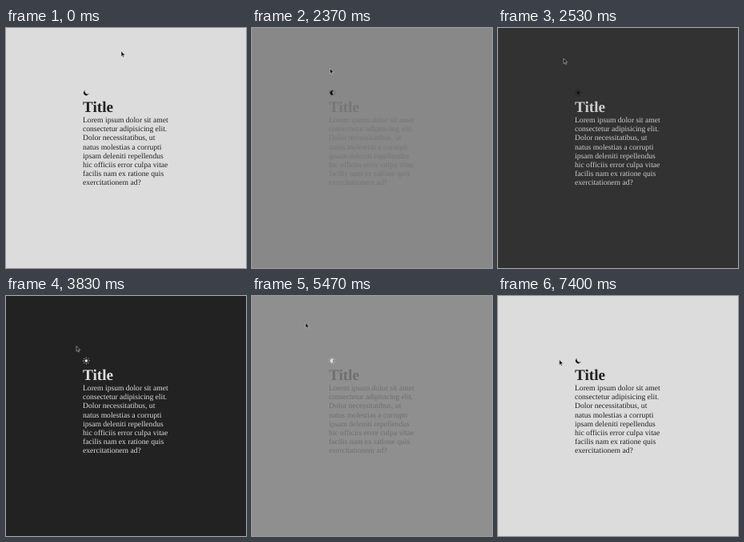
Recreate the animation shown at these times as an HTML page. Size 300x300 px, loop 7.43 s.

```html
<!DOCTYPE html>
<html lang="en">
<head>
<meta charset="utf-8">
<title>Theme toggle</title>
<style>
  html, body { margin: 0; width: 100%; height: 100%; overflow: hidden; }
  svg { display: block; width: 100%; height: 100%; }
  text { font-family: "Liberation Serif", "Times New Roman", serif; font-size: 9.6px; text-rendering: geometricPrecision; }
  .title { font-size: 19.2px; font-weight: bold; }
</style>
</head>
<body>
<svg viewBox="0 0 300 300">
  <rect id="page" width="300" height="300"/>
  <g id="copy"><text class="title" x="96" y="105">Title</text></g>
  <g transform="translate(95.9 76.6) scale(.364)">
    <g id="icon">
      <mask id="bite" maskUnits="userSpaceOnUse" x="-12" y="-12" width="48" height="48">
        <rect x="-12" y="-12" width="48" height="48" fill="#fff"/>
        <circle id="shadow" r="9"/>
      </mask>
      <circle id="core" cx="12" cy="12" mask="url(#bite)"/>
      <g id="rays" stroke-width="2" stroke-linecap="round"></g>
    </g>
  </g>
  <path id="cursor" d="M0 0V6.6L1.5 5.3 2.5 7.5 3.6 7 2.6 4.9H4.7Z" fill="#111" stroke="#d8d8d8" stroke-width=".55"/>
</svg>
<script>
const LOOP = 7430;
const FADE = 430;
const TO_DARK = 2255;
const TO_LIGHT = 5325;
const SPRING_LEAD = 20;

const lines = [
  'Lorem ipsum dolor sit amet',
  'consectetur adipisicing elit.',
  'Dolor necessitatibus, ut',
  'natus molestias a corrupti',
  'ipsam deleniti repellendus',
  'hic officiis error culpa vitae',
  'facilis nam ex ratione quis',
  'exercitationem ad?'
];

const linear = p => p;
const easeIn = p => p ** 1.7;
const easeOut = p => 1 - (1 - p) ** 1.7;
const easeInOut = p => p * p * (3 - 2 * p);

// time, x, y, easing towards the next stop
const path = [
  [0, 144, 29, easeInOut],
  [780, 112.5, 80, easeOut],
  [1230, 100.5, 80, linear],
  [2110, 100.5, 80, easeIn],
  [2370, 97.5, 50.5, linear],
  [2530, 82, 38, easeOut],
  [2880, 66.5, 36.5, easeInOut],
  [3100, 70.5, 38.5, linear],
  [3480, 70.5, 38.5, easeIn],
  [3830, 88, 62.5, easeOut],
  [4240, 94.8, 75, easeInOut],
  [4630, 101.8, 77.3, linear],
  [4980, 101.8, 77.3, easeInOut],
  [5470, 67, 33.5, linear],
  [5600, 62.3, 30.8, easeOut],
  [5770, 61.5, 31.3, easeInOut],
  [6170, 63.3, 35.3, linear],
  [6980, 63.3, 35.3, easeInOut],
  [7400, 76.7, 79.7, linear],
  [LOOP, 76.7, 79.7, linear]
];

const $ = id => document.getElementById(id);
const mix = (a, b, p) => a + (b - a) * p;
const gray = v => `rgb(${v},${v},${v})`;

function add(parent, tag, attrs) {
  const node = document.createElementNS('http://www.w3.org/2000/svg', tag);
  for (const key in attrs) node.setAttribute(key, attrs[key]);
  return parent.appendChild(node);
}

lines.forEach((line, i) => {
  add($('copy'), 'text', { x: 96, y: 118.2 + i * 11.14 }).textContent = line;
});
for (let angle = 0; angle < 360; angle += 45) {
  add($('rays'), 'path', { d: 'M12 1V3', transform: `rotate(${angle} 12 12)` });
}

// CSS "ease": cubic-bezier(.25, .1, .25, 1)
function ease(p) {
  if (p <= 0) return 0;
  if (p >= 1) return 1;
  const bezier = (a, b, u) => 3 * a * u * (1 - u) ** 2 + 3 * b * u * u * (1 - u) + u ** 3;
  let low = 0, high = 1;
  for (let i = 0; i < 24; i++) {
    const mid = (low + high) / 2;
    if (bezier(.25, .25, mid) < p) low = mid; else high = mid;
  }
  return bezier(.1, 1, low);
}

// Damped spring: mass 4, tension 250, friction 35
function spring(ms) {
  if (ms <= 0) return 0;
  const t = ms / 1000, decay = 35 / 8;
  const freq = Math.sqrt(250 / 4 - decay * decay);
  return 1 - Math.exp(-decay * t) * (Math.cos(freq * t) + decay / freq * Math.sin(freq * t));
}

const darkness = (t, delay) =>
  ease((t - TO_DARK - delay) / FADE) - ease((t - TO_LIGHT - delay) / FADE);

function drawIcon(t) {
  const sun = spring(t - TO_DARK + SPRING_LEAD) - spring(t - TO_LIGHT + SPRING_LEAD);
  $('icon').setAttribute('transform', `rotate(${mix(40, 90, sun)} 12 12)`);
  $('core').setAttribute('r', mix(9, 5, sun));
  $('shadow').setAttribute('cx', mix(12, 24, sun));
  $('shadow').setAttribute('cy', mix(5.52, 0, sun));
  $('rays').setAttribute('opacity', Math.min(1, Math.max(0, sun)));
  // The icon colour follows once the page colour has settled
  const color = gray(mix(17, 226, darkness(t, FADE)));
  $('core').setAttribute('fill', color);
  $('rays').setAttribute('stroke', color);
}

function drawCursor(t) {
  const i = path.findIndex(stop => stop[0] > t) - 1;
  const [start, x, y, easing] = path[i];
  const [end, nextX, nextY] = path[i + 1];
  const p = easing((t - start) / (end - start));
  $('cursor').setAttribute('transform', `translate(${mix(x, nextX, p)} ${mix(y, nextY, p)})`);
}

function draw(now) {
  const t = Math.max(0, now) % LOOP;
  const dark = darkness(t, 0);
  $('page').setAttribute('fill', gray(mix(220, 34, dark)));
  $('copy').setAttribute('fill', gray(mix(34, 220, dark)));
  drawIcon(t);
  drawCursor(t);
}

const begin = performance.now();
function tick() {
  draw(performance.now() - begin);
  requestAnimationFrame(tick);
}
tick();
</script>
</body>
</html>
```
